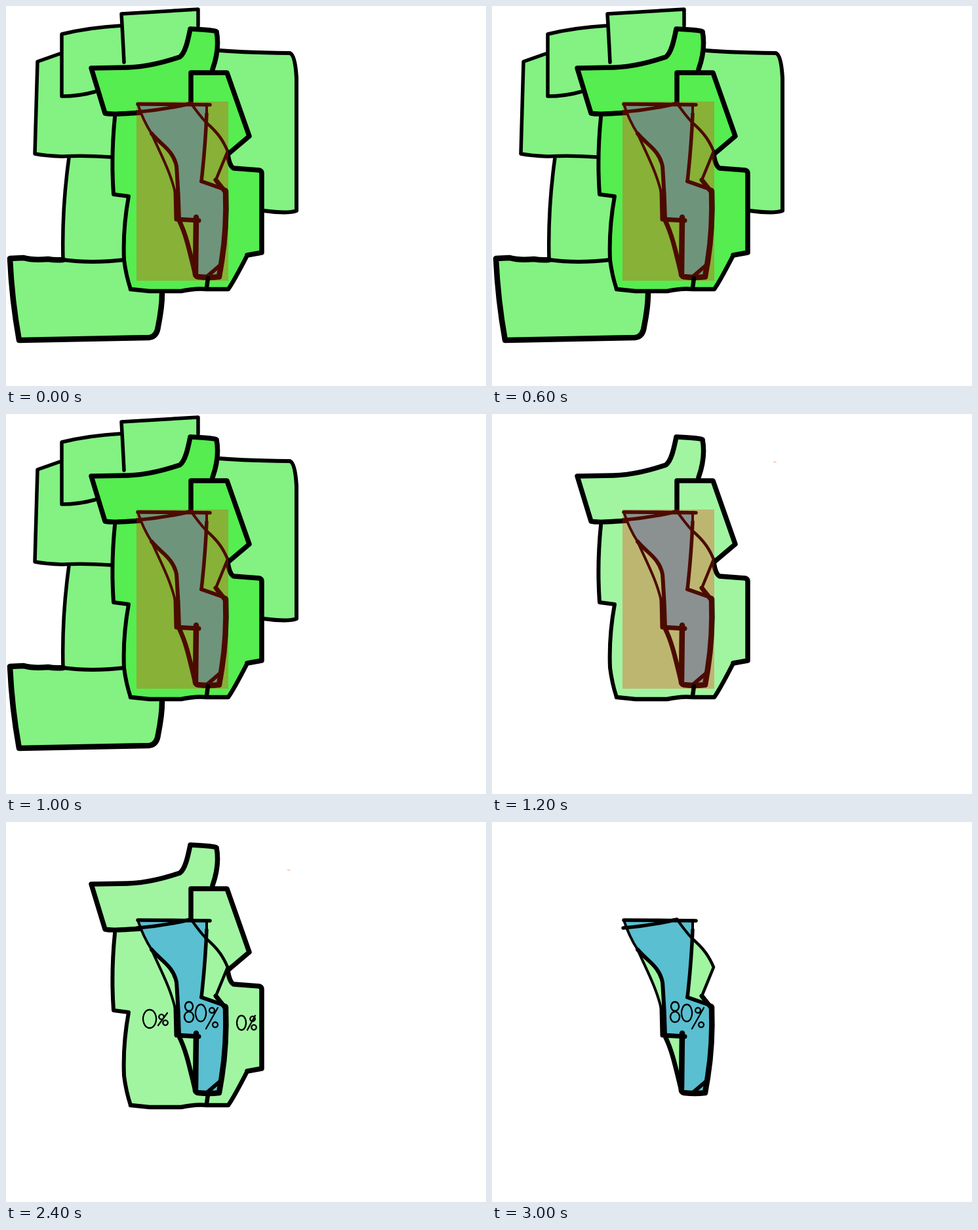
These frames come from a looping animation (732x581 px, 3800 ms). An HTML page:

```html
<!DOCTYPE html>
<html lang="en">
<head>
<meta charset="utf-8">
<title>Region overlap</title>
<style>
html, body { margin: 0; width: 100%; height: 100%; overflow: hidden; background: #fff; }
svg { display: block; width: 732px; height: 581px; --green: #a1f5a1; --blue: #5abfd0; }
svg.bright { --green: #55ed4f; --blue: #32c4b1; }
path { fill: none; stroke: #000; stroke-width: 7.5; stroke-linecap: round; stroke-linejoin: round; }
.green, .blue { stroke: none; }
.green { fill: var(--green); }
.blue { fill: var(--blue); }
#blocks .fill { fill: #83f282; stroke: none; }
.thin { stroke-width: 4; }
.mid { stroke-width: 5.5; }
.heavy { stroke-width: 8.5; }
.label path { stroke-width: 2.3; }
</style>
</head>
<body>
<svg id="stage" viewBox="0 0 732 581">
  <g id="blocks">
    <path class="fill" d="M176 12L293 5V100H180Z M85 43Q125 33 176 30L190 100L136 131Q110 138 85 138Z M48 85L85 72V130H180L162 231Q120 228 85 230Q60 229 44 226Z M317 67Q350 71 436 72Q444 85 443 110V313Q430 318 393 313L300 240Z M96 228H190L181 390H87Q85 310 96 228Z M5 386Q45 385 87 388Q130 395 181 388L238 440Q238 460 232 490Q230 505 222 507L20 511Z"/>
    <path class="mid" d="M180 86Q178 45 176 12L293 5V30 M85 138V43Q125 33 176 30 M85 138Q112 138 136 131 M82 73L48 85L44 226Q60 229 85 230Q120 228 160 231 M96 232Q85 310 87 388"/>
    <path d="M317 67Q350 71 433 72Q441 75 443 110V313Q430 318 393 313 M87 388Q130 394 181 388" style="stroke-width:6"/>
    <path class="heavy" d="M87 388Q75 389 64 387Q40 389 27 385L6 386Q9 450 20 511L218 507Q230 506 232 490Q238 460 238 440"/>
  </g>

  <g id="body">
    <path class="green" d="M130 95L185 94C215 92 240 85 265 78C273 72 277 55 281 36L322 38C325 60 321 80 315 98L337 102L371 199L337 227L345 247L390 252V377L368 381L339 433L190 433Q183 412 180 388Q179 340 187 291L164 288Q160 230 166 168L151 164Z"/>
    <path d="M315 97C321 80 325 60 321 39Q320 37 281 35C277 55 273 72 265 78C240 86 215 93 185 94L130 95L151 164C165 167 185 164 206 163"/>
    <path d="M282 149V102H337L371 199L338 227Q341 245 347 248L386 251Q390 252 390 256V377L368 381"/>
    <path d="M166 170Q160 230 164 288L187 291Q178 340 180 388Q183 412 190 433" style="stroke-width:6"/>
    <path d="M190 433L219 436H267Q290 431 306 433H339Q348 420 368 381" style="stroke-width:6.5"/>
  </g>

  <g id="core">
    <path class="green" d="M222 195C235 225 252 255 259 290L262 326C275 350 280 375 288 410L292 320L265 240Z M306 178C325 195 332 208 338 222L320 266L335 283L298 268Z"/>
    <path class="blue" d="M201 150H306L298 268L335 281Q337 340 329 390L325 414H290V328L265 326C261 290 262 270 261 250C258 220 236 212 222 195Q209 175 201 150Z"/>
    <path class="mid" d="M201 150Q245 150 311 151 M200 162Q240 159 282 149 M306 165Q304 215 298 268"/>
    <path class="thin" d="M201 150Q209 175 222 195C235 225 252 255 259 290 M306 150V175 M283 150C290 160 296 168 305 178"/>
    <path d="M305 178C325 195 332 208 338 222L320 266" style="stroke-width:4.5"/>
    <path d="M222 195C236 212 255 220 260 245Q263 285 264 326 M298 268L335 281 M327 396L306 414" style="stroke-width:6"/>
    <path d="M259 284L260 326L294 328 M264 328C275 350 280 375 288 408 M320 266L335 285" style="stroke-width:7"/>
    <path class="heavy" d="M335 283Q337 340 329 390L325 414Q310 416 293 414Q288 413 289 407L290 323"/>
  </g>
  <rect id="tint" x="199" y="146" width="140" height="274" fill="#fa2600" opacity=".3"/>
  <path id="notch" d="M308 416L306 431" style="stroke-width:6.5"/>
  <path id="speck" d="M429.5 73L433 74" style="stroke:#f7c0a4;stroke-width:1.5"/>
  <g id="labels"></g>
</svg>
<script>
const $ = id => document.getElementById(id);
const LOOP = 3800;

const oval = (x, y, rx, ry = rx) =>
  `M${x} ${y - ry}a${rx} ${ry} 0 1 0 .1 0`;
const one = (x, top, bottom, w) =>
  `M${x - 4} ${top + 4}L${x} ${top}V${bottom}M${x - w} ${bottom}h${2 * w}`;
const percent = (x1, y1, x2, y2, r, sx, sy, ex, ey) =>
  oval(x1, y1, r) + oval(x2, y2, r) + `M${sx} ${sy}L${ex} ${ey}`;

// Each label: time it appears, then its strokes
const labels = [
  [2300, oval(279, 282, 6, 7) + oval(279, 298, 7, 8) + oval(297, 292, 8, 13) +
    percent(314, 288, 319, 310, 4, 323, 284, 305, 316)],
  [2400, oval(219, 301, 10, 14) + percent(237, 298, 243, 307, 3.8, 246, 292, 232, 311)],
  [2400, oval(359, 307, 7, 11) + percent(376, 301, 378, 314, 3.8, 380, 296, 368, 318)],
  [2500, one(179, 111, 129, 4) + oval(190, 119, 6, 10) + "M196 106h4" +
    one(205, 102, 116, 3) + oval(215, 108, 6, 7) +
    percent(236, 113, 243, 122, 3, 245, 109, 234, 126)],
  [2600, one(304, 125, 141, 3) + oval(312, 133, 5, 8) + "M315 121h4" +
    one(323, 115, 128, 2) + oval(330, 122, 4.5, 6) +
    percent(330, 138, 335, 145, 2.8, 336, 132, 328, 149)]
];
$("labels").innerHTML = labels.map(([, d]) => `<g class="label"><path d="${d}"/></g>`).join("");
const labelNodes = [...$("labels").children];

const show = (node, on) => node.style.display = on ? "" : "none";

function draw(now) {
  const t = now % LOOP;
  const bright = t < 500 || (t >= 600 && t < 800) || (t >= 1000 && t < 1200);
  const final = t >= 3000;
  $("stage").classList.toggle("bright", bright);
  show($("blocks"), bright);
  show($("body"), !final);
  show($("notch"), !final);
  show($("speck"), !bright && !final);
  show($("tint"), t < 2100);
  labelNodes.forEach((node, i) => show(node, t >= labels[i][0] && (!final || i === 0)));
}

const start = performance.now();
function tick() {
  draw(performance.now() - start);
  requestAnimationFrame(tick);
}
tick();
</script>
</body>
</html>
```
